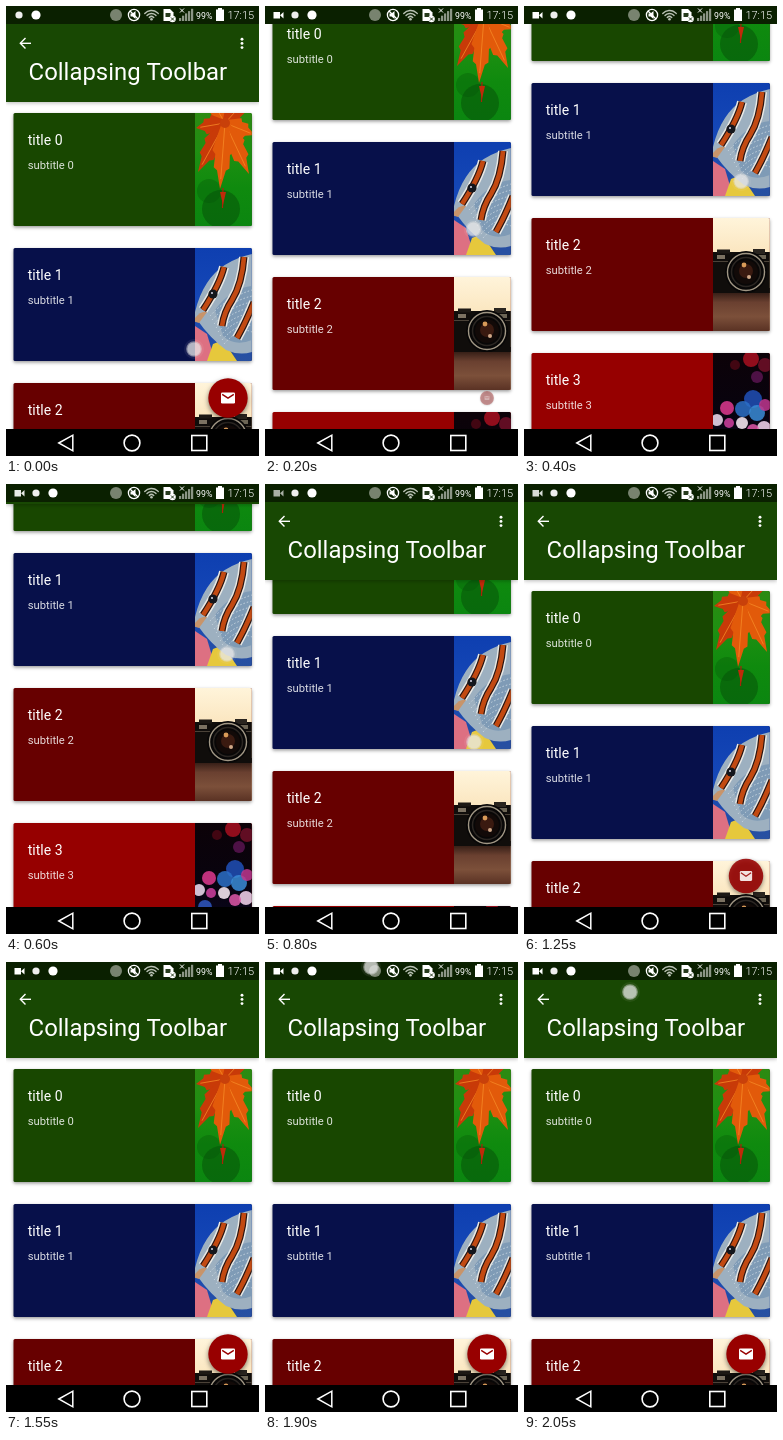
Animation of 253 by 450 pixels, one loop 2.1 s. Source, as an HTML page with a canvas:

```html
<!DOCTYPE html>
<html lang="en">
<head>
<meta charset="utf-8">
<title>Collapsing Toolbar</title>
<style>
html, body { margin: 0; width: 100%; height: 100%; overflow: hidden; background: #fff; }
canvas { display: block; width: 253px; height: 450px; }
</style>
</head>
<body>
<canvas id="stage"></canvas>
<script>
const W = 253, H = 450, LOOP = 2100, STEP = 50;
const BAR = 18, TOOLBAR = 78, CARD_H = 113, PITCH = 135, DEEPEST = -175;
const canvas = document.getElementById('stage');
const ctx = canvas.getContext('2d');
const dpr = window.devicePixelRatio || 1;
canvas.width = W * dpr;
canvas.height = H * dpr;

const GREEN = '#184803';
const FONT = 'Roboto, "Noto Sans", sans-serif';
const clamp = (v, a, b) => Math.min(b, Math.max(a, v));

// Keys are [time, value]
const SCROLL = [[0, 0], [50, -8], [100, -38], [150, -74], [200, -106], [300, -146],
  [450, -170], [550, DEEPEST], [600, -173], [700, -139], [800, -90], [900, -41], [1000, -7.4], [1075, 0]];
const TOUCH_X = [[0, 188], [200, 208.5], [600, 221], [800, 209], [1000, 206], [1100, 206]];
const TOUCH_Y = [[0, 343], [50, 325], [100, 292], [200, 223], [300, 190], [450, 172],
  [600, 170], [700, 209], [800, 258], [900, 304], [1000, 338], [1100, 346]];

// Smooth cubic through the keys, at rest at both ends
function track(keys, t) {
  const last = keys.length - 1;
  if (t <= keys[0][0]) return keys[0][1];
  if (t >= keys[last][0]) return keys[last][1];
  let i = 0;
  while (t >= keys[i + 1][0]) i++;
  const slope = k => {
    if (k === 0 || k === last) return 0;
    const [a, b, c] = [keys[k - 1], keys[k], keys[k + 1]];
    const l = (b[1] - a[1]) / (b[0] - a[0]), r = (c[1] - b[1]) / (c[0] - b[0]);
    return l * r <= 0 ? 0 : 2 * l * r / (l + r);
  };
  const [t0, v0] = keys[i], [t1, v1] = keys[i + 1];
  const d = t1 - t0, u = (t - t0) / d, w = 1 - u;
  return v0 * w * w * (1 + 2 * u) + v1 * u * u * (3 - 2 * u) +
    d * u * w * (slope(i) * w - slope(i + 1) * u);
}

function rect(x, y, w, h, fill) {
  ctx.fillStyle = fill;
  ctx.fillRect(x, y, w, h);
}

function disc(x, y, r, fill) {
  ctx.fillStyle = fill;
  ctx.beginPath();
  ctx.arc(x, y, r, 0, Math.PI * 2);
  ctx.fill();
}

function ring(x, y, r, color, width) {
  ctx.strokeStyle = color;
  ctx.lineWidth = width;
  ctx.beginPath();
  ctx.arc(x, y, r, 0, Math.PI * 2);
  ctx.stroke();
}

function path(points, close) {
  ctx.beginPath();
  points.forEach(([x, y]) => ctx.lineTo(x, y));
  if (close) ctx.closePath();
}

function poly(points, fill) {
  path(points, true);
  ctx.fillStyle = fill;
  ctx.fill();
}

function line(points, color, width, close) {
  path(points, close);
  ctx.strokeStyle = color;
  ctx.lineWidth = width;
  ctx.stroke();
}

function curve(d, color, width) {
  const p = new Path2D(d);
  if (width) {
    ctx.strokeStyle = color;
    ctx.lineWidth = width;
    ctx.stroke(p);
  } else {
    ctx.fillStyle = color;
    ctx.fill(p);
  }
}

function text(str, x, y, size, color, weight = 400) {
  ctx.font = `${weight} ${size}px ${FONT}`;
  ctx.fillStyle = color;
  ctx.fillText(str, x, y);
}

function fade(y0, y1, ...colors) {
  const g = ctx.createLinearGradient(0, y0, 0, y1);
  colors.forEach((c, i) => g.addColorStop(i / (colors.length - 1), c));
  return g;
}

function shadow(color, blur, dy) {
  ctx.shadowColor = color;
  ctx.shadowBlur = blur * dpr;
  ctx.shadowOffsetY = dy * dpr;
}

// Photos fill a 57 x 113 box

function lobe(cx, cy, tx, ty, half, fill) {
  const dx = tx - cx, dy = ty - cy, len = Math.hypot(dx, dy);
  const side = [[0, 0.3], [0.42, 1], [0.48, 0.7], [0.68, 0.75], [0.72, 0.42], [1, 0]];
  const at = (s, sign) => [cx + dx * s[0] - sign * dy / len * half * s[1],
    cy + dy * s[0] + sign * dx / len * half * s[1]];
  poly([...side.map(s => at(s, 1)), ...side.slice().reverse().map(s => at(s, -1))], fill);
  line([[cx, cy], [cx + dx * 0.85, cy + dy * 0.85]], '#f58a26', 0.8);
}

function leaves() {
  rect(0, 0, 57, CARD_H, fade(0, CARD_H, '#2c8a12', '#1f9012', '#0f8a0e', '#0b8610'));
  disc(26, 96, 19, 'rgba(6,72,8,.45)');
  disc(14, 78, 12, 'rgba(6,80,8,.3)');
  const tips = [[16, -14], [50, -12], [60, 22], [1, 15], [54, 61], [3, 59], [25, 76]];
  tips.forEach(([x, y], i) => lobe(30, 10, x, y, 10.5, i % 2 ? '#c83a08' : '#e25a0a'));
  disc(30, 10, 5, '#c8400a');
  line([[28, 75], [27.5, 95]], '#a82408', 1.2);
  poly([[25, 79], [31, 79], [28, 92]], '#c02a0a');
}

function fish() {
  rect(0, 0, 57, CARD_H, fade(0, CARD_H, '#0e3fb0', '#1648b8', '#2850a0'));
  curve('M0 78 L12 86 L20 113 H0Z', '#dd7082');
  curve('M12 113 L18 96 L28 92 L42 113Z', '#e6c83c');
  curve('M-2 74 Q2 50 12 35 Q26 13 57 6 V104 Q44 108 31 102 Q15 90 3 73Z', '#9db0c0');
  curve('M20 62 Q36 40 57 38 V92 Q40 99 28 88Z', '#7f9bb6');
  ctx.save();
  ctx.setLineDash([1.5, 2]);
  for (let i = 0; i < 8; i++) curve(`M${15 + i * 2} ${68 + i * 4} Q${31 + i * 2} ${50 + i * 4} 57 ${42 + i * 6}`, '#d5e0e8', 0.8);
  ctx.restore();
  const stripes = ['M29 19 Q25 36 8 62', 'M49 9 Q47 36 37 52 Q29 64 27 78', 'M59 54 Q51 74 42 90'];
  stripes.forEach(s => {
    curve(s, '#e8e8e4', 10);
    curve(s, '#2a1512', 7);
    curve(s, '#c24a12', 4.6);
  });
  curve('M-2 73 Q5 62 12 64 L4 75Z', '#c8946a');
  disc(18, 46, 4.6, '#14161c');
  disc(17, 45, 1.1, '#ccd');
}

function camera() {
  rect(0, 0, 57, CARD_H, fade(0, 40, '#fff4da', '#fae4bc'));
  rect(0, 70, 57, 43, fade(70, CARD_H, '#1c0e0a', '#6a4030', '#7c503a', '#5a3224'));
  rect(0, 34, 57, 41, '#100d0b');
  rect(4, 31.5, 13, 4, '#1d1915');
  rect(40, 31, 12, 5, '#2a251f');
  rect(0, 43, 57, 1, '#4b4238');
  rect(4, 37, 8, 4, '#7c7262');
  rect(44, 37, 9, 4, '#6c6555');
  disc(33, 54, 21, '#080707');
  ring(33, 54, 18.5, '#a09684', 1.4);
  ring(33, 54, 14.5, '#2b2622', 1.5);
  disc(33, 54, 12, '#120a08');
  disc(33, 53, 7, '#3a1a10');
  disc(31, 47, 2.4, '#d89a58');
  disc(36, 59, 2, '#d0a888');
}

function lights() {
  rect(0, 0, 57, CARD_H, fade(0, CARD_H, '#0c0208', '#08030e', '#0a0620'));
  const spots = [[38, 6, 8, '#a81020'], [52, 12, 7, '#701028'], [22, 12, 5, '#4c0814'],
    [44, 24, 6, '#5a1450'], [40, 46, 9, '#2050b8'], [30, 56, 8, '#2c70c8'], [44, 60, 8, '#3a8cd8'],
    [14, 55, 7, '#e03a90'], [52, 52, 6, '#c03890'], [4, 67, 6, '#f4e0f4'], [29, 70, 6, '#fff0fa'],
    [16, 70, 5, '#d040a0'], [51, 75, 7, '#f8d8f0'], [40, 77, 6, '#e058a8'], [10, 84, 7, '#3058c0']];
  ctx.save();
  ctx.globalAlpha = 0.85;
  spots.forEach(([x, y, r, c]) => disc(x, y, r, c));
  ctx.restore();
}

const CARDS = [['#184700', leaves], ['#07104a', fish], ['#670000', camera], ['#960000', lights]];

function card(i, y) {
  const [color, photo] = CARDS[i];
  ctx.save();
  ctx.translate(7.5, y);
  ctx.beginPath();
  ctx.roundRect(0, 0, 238.3, CARD_H, 1.5);
  ctx.save();
  shadow('rgba(0,0,0,.4)', 3.5, 1.4);
  ctx.fillStyle = color;
  ctx.fill();
  ctx.restore();
  ctx.clip();
  text('title ' + i, 14.2, 32.2, 14.06, '#fff');
  text('subtitle ' + i, 14.2, 56.1, 11.24, 'rgba(255,255,255,.85)');
  ctx.translate(181.5, 0);
  ctx.beginPath();
  ctx.rect(0, 0, 57, CARD_H);
  ctx.clip();
  photo();
  ctx.restore();
}

function toolbar(hide) {
  if (hide >= TOOLBAR) return;
  ctx.save();
  ctx.translate(0, -hide);
  ctx.save();
  shadow('rgba(0,0,0,.28)', 4, 1.2);
  rect(0, BAR, W, TOOLBAR, GREEN);
  ctx.restore();
  line([[25, 37.3], [14.5, 37.3]], '#fff', 1.4);
  line([[19.5, 32], [14.3, 37.3], [19.5, 42.6]], '#fff', 1.4);
  [33.2, 37.4, 41.6].forEach(y => disc(236, y, 1.45, '#fff'));
  text('Collapsing Toolbar', 22.6, 74.3, 23.9, '#fff');
  ctx.restore();
}

function statusBar(recording, glow) {
  rect(0, 0, W, BAR, '#0a2000');
  const shift = recording ? 17 : 0;
  if (recording) {
    ctx.globalAlpha = glow;
    rect(8.5, 6, 6.5, 6.5, '#fff');
    poly([[15, 9.2], [18.5, 6], [18.5, 12.5]], '#fff');
    ctx.globalAlpha = 1;
  }
  disc(13 + shift, 9, 3.6, '#eee');
  disc(30 + shift, 9, 4.6, '#fff');
  disc(110, 9, 6, '#78836f');

  ring(128, 9, 5.6, '#fff', 1.3);
  poly([[124.5, 7.5], [126.5, 7.5], [129.5, 5], [129.5, 13], [126.5, 10.5], [124.5, 10.5]], '#fff');
  line([[124, 5], [132, 13]], '#fff', 1.2);

  ctx.lineCap = 'round';
  [3, 6, 9].forEach(r => {
    ctx.beginPath();
    ctx.arc(145.5, 13.5, r, -Math.PI * 0.77, -Math.PI * 0.23);
    ctx.strokeStyle = '#b9c1b3';
    ctx.lineWidth = 1.4;
    ctx.stroke();
  });
  ctx.lineCap = 'butt';
  disc(145.5, 13.2, 1.3, '#b9c1b3');

  poly([[157.5, 3], [164, 3], [167.5, 6.5], [167.5, 15], [157.5, 15]], '#fff');
  rect(159.5, 7, 5, 4, '#263b1c');
  disc(166.5, 13, 3.3, '#fff');
  line([[165, 11.5], [168, 14.5]], '#263b1c', 1);
  line([[168, 11.5], [165, 14.5]], '#263b1c', 1);

  for (let i = 0; i < 5; i++) rect(173 + i * 3, 12 - i * 2.3, 2.2, 3 + i * 2.3, '#8b9585');
  line([[174, 2.5], [178, 6.5]], '#fff', 1);
  line([[178, 2.5], [174, 6.5]], '#fff', 1);

  text('99%', 190, 12.6, 8.8, '#fff');
  rect(212, 2, 4, 2, '#fff');
  rect(210, 3.5, 8, 11.5, '#fff');
  text('17:15', 221.4, 13.2, 11, '#fff', 300);
}

function navBar() {
  rect(0, 423, W, 27, '#000');
  line([[52.8, 437], [66.8, 429.2], [66.8, 444.8]], '#fff', 1.5, true);
  ring(126, 437, 7.9, '#fff', 1.6);
  ctx.strokeRect(185.8, 429.5, 15, 15);
}

function fabScale(t) {
  if (t < 700) return 1 - clamp((t - 50) / 200, 0, 1) ** 1.5;
  return 1 - (1 - clamp((t - 1100) / 200, 0, 1)) ** 1.5;
}

function fab(scale) {
  if (scale <= 0) return;
  ctx.save();
  ctx.globalAlpha = scale;
  ctx.translate(222, 392);
  ctx.scale(scale, scale);
  ctx.save();
  shadow('rgba(0,0,0,.5)', 5 * scale, 2 * scale);
  disc(0, 0, 19.7, '#980000');
  ctx.restore();
  ctx.fillStyle = '#fff';
  ctx.beginPath();
  ctx.roundRect(-7, -5.6, 14, 11.2, 1.3);
  ctx.fill();
  line([[-5.8, -3.6], [0, 0.2], [5.8, -3.6]], '#980000', 1.4);
  ctx.restore();
}

function touch(t) {
  let x, y;
  if (t <= 1100) {
    x = track(TOUCH_X, t);
    y = track(TOUCH_Y, t);
  } else if (t >= 1900) {
    x = 106;
    y = 5 + 25 * (t - 1900) / 150;
  } else return;
  disc(x, y, 10, 'rgba(255,235,235,.07)');
  disc(x, y, 7.8, 'rgba(225,225,225,.5)');
  disc(x, y, 6.6, 'rgba(235,235,235,.5)');
}

function draw(t) {
  ctx.setTransform(dpr, 0, 0, dpr, 0, 0);
  rect(0, 0, W, H, '#fff');
  const scroll = Math.round(track(SCROLL, t));
  const hide = clamp(t <= 550 ? -scroll : TOOLBAR - (scroll - DEEPEST), 0, TOOLBAR);
  CARDS.forEach((_, i) => card(i, 107 + scroll + i * PITCH));
  toolbar(hide);
  fab(fabScale(t));
  // The recording icon dims and brightens once per loop
  const dim = Math.cos(clamp((t - 950) / 500, -1, 1) * Math.PI / 2) ** 2;
  statusBar(t >= STEP, 1 - 0.45 * dim);
  navBar();
  touch(t);
}

let start;
function tick(now) {
  if (start === undefined) start = now;
  const t = Math.max(0, now - start) % LOOP;
  draw(Math.floor(t / STEP) * STEP);
  requestAnimationFrame(tick);
}
draw(0);
requestAnimationFrame(tick);
</script>
</body>
</html>
```
